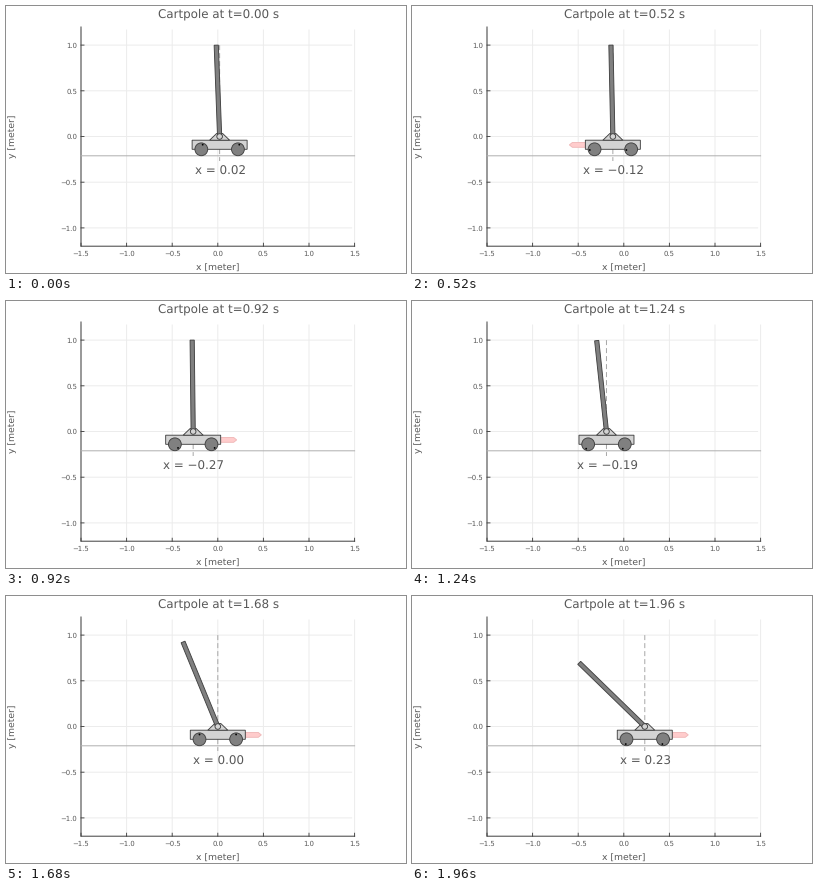
Recreate the animation shown at these times as a matplotlib script. Size 400 by 267 pixels, loop 2 s.

```python
import numpy as np
import matplotlib.pyplot as plt
from matplotlib.animation import FuncAnimation
from matplotlib.patches import Circle, Polygon

W, H, DPI = 400, 267, 100
FRAMES, STEP = 50, 40
PX = 72 / DPI  # points per pixel
INK, EDGE = "#585858", "#404040"
TITLE, GUIDE, TICK = 11.9, 9.3, 6.9  # font sizes in pixels

# Key poses: time, cart position, pole tilt to the left, push direction
KEY_T = np.array([0, 0.24, 0.52, 0.92, 1.24, 1.68, 1.96])
KEY_X = np.array([0.02, -0.04, -0.12, -0.27, -0.19, 0.0, 0.23])
KEY_TILT = np.array([0.037, 0.028, 0.021, 0.011, 0.107, 0.39, 0.80])
KEY_PUSH = np.array([0, 0, -1, 1, 0, 1, 1])

plt.rcParams.update({"font.family": "DejaVu Sans", "text.hinting": "none"})


def smooth(t, keys):
    """Cubic Hermite curve through the keys."""
    slope = np.gradient(keys, KEY_T, edge_order=2)
    i = min(np.searchsorted(KEY_T, t, side="right") - 1, len(KEY_T) - 2)
    h = KEY_T[i + 1] - KEY_T[i]
    u = (t - KEY_T[i]) / h
    return ((1 + 2 * u) * (1 - u) ** 2 * keys[i] + u * (1 - u) ** 2 * h * slope[i]
            + u * u * (3 - 2 * u) * keys[i + 1] + u * u * (u - 1) * h * slope[i + 1])


def sx(v):
    return 211.8 + 91.2 * v


def sy(v):
    return 130.5 - 91.4 * v


def number(v, digits):
    return f"{round(v, digits) + 0:.{digits}f}".replace("-", "\u2212")


fig = plt.figure(figsize=(W / DPI, H / DPI), dpi=DPI, facecolor="white")
ax = fig.add_axes([0, 0, 1, 1])
ax.set_xlim(0, W)
ax.set_ylim(H, 0)
ax.axis("off")


def line(x, y, color, width=1.0, z=1, **kw):
    return ax.plot(x, y, color=color, lw=width * PX, zorder=z, snap=False, **kw)[0]


def write(text, x, y, size, ha="center", va="center_baseline", **kw):
    return ax.text(x, y, text, fontsize=size * PX, ha=ha, va=va, color=INK, **kw)


def shape(patch, fill, edge=EDGE, z=4, width=0.9):
    patch.set(facecolor=fill, edgecolor=edge, linewidth=width * PX, zorder=z, snap=False)
    return ax.add_patch(patch)


def poly(fill, edge=EDGE, z=4):
    return shape(Polygon([(0, 0), (1, 0), (1, 1)]), fill, edge, z)


def disc(radius, fill, edge=EDGE, z=5):
    return shape(Circle((0, 0), radius), fill, edge, z)


# Plot frame
LEFT, RIGHT, TOP, BOTTOM = 75, 348.6, 21, 240.2
for v in np.arange(-1.5, 1.6, 0.5):
    line([sx(v)] * 2, [TOP + 3, BOTTOM], "#ececec")
    line([sx(v)] * 2, [BOTTOM - 3, BOTTOM], EDGE, 0.9, 2)
    write(number(v, 1), sx(v), 246.8, TICK)
for v in np.arange(-1, 1.1, 0.5):
    line([LEFT, RIGHT - 3], [sy(v)] * 2, "#ececec")
    line([LEFT, LEFT + 3], [sy(v)] * 2, EDGE, 0.9, 2)
    write(number(v, 1), 71.3, sy(v), TICK, ha="right")
line([LEFT, LEFT, RIGHT], [TOP, BOTTOM, BOTTOM], EDGE, 1, 2)
line([LEFT, RIGHT], [149.8] * 2, "#b0b0b0", 1, 2)
write("x [meter]", 212, 262.6, GUIDE, va="center")
write("y [meter]", 6.8, 130.5, GUIDE, va="center", rotation=90)

# Moving parts
title = write("", 212.4, 11.8, TITLE, va="baseline")
readout = write("", 0, 168.6, TITLE, va="baseline")
plumb = line([], [], "#a8a8a8", 1, 3, linestyle=(0, (5, 3)))
arrow = poly("#ffcccc", "#f0b8b8", 3)
body = poly("#d3d3d3")
mount = poly("#d3d3d3")
wheels = [disc(6.4, "#808080") for _ in range(2)]
dots = [disc(0.9, "black", "none", 6) for _ in range(2)]
pole = poly("#808080", z=7)
pivot = disc(2.8, "#d3d3d3", z=8)


def update(i):
    t = i * STEP / 1000
    x, tilt = smooth(t, KEY_X), smooth(t, KEY_TILT)
    push = KEY_PUSH[np.abs(KEY_T - t).argmin()]
    c, y0 = sx(x), sy(0)

    title.set_text(f"Cartpole at t={t:.2f} s")
    readout.set_text(f"x = {number(x, 2)}")
    readout.set_x(c + 0.6)
    plumb.set_data([c, c], [sy(1), 155])

    body.set_xy([(c - 27.5, 134.2), (c + 27.5, 134.2), (c + 27.5, 143.3), (c - 27.5, 143.3)])
    mount.set_xy([(c - 10, 134.2), (c - 3, 127.5), (c + 3, 127.5), (c + 10, 134.2)])
    roll = x / 0.07
    for wheel, dot, side in zip(wheels, dots, (-18.3, 18.3)):
        wheel.center = c + side, 143.3
        dot.center = c + side + 4.8 * np.sin(roll), 143.3 - 4.8 * np.cos(roll)

    along = np.array([-np.sin(tilt), -np.cos(tilt)]) * 91.4
    across = np.array([np.cos(tilt), -np.sin(tilt)]) * 2.1
    base = np.array([c, y0])
    pole.set_xy([base - across, base + across, base + along + across, base + along - across])
    pivot.center = c, y0

    arrow.set_visible(push != 0)
    arrow.set_xy([(c + push * u, 138.9 + v) for u, v in
                  ((27.5, -2.4), (40.5, -2.4), (43.5, 0), (40.5, 2.4), (27.5, 2.4))])
    return title, readout, plumb, arrow, body, mount, *wheels, *dots, pole, pivot


anim = FuncAnimation(fig, update, frames=FRAMES, interval=STEP, repeat=True, repeat_delay=0)
plt.show()
```
